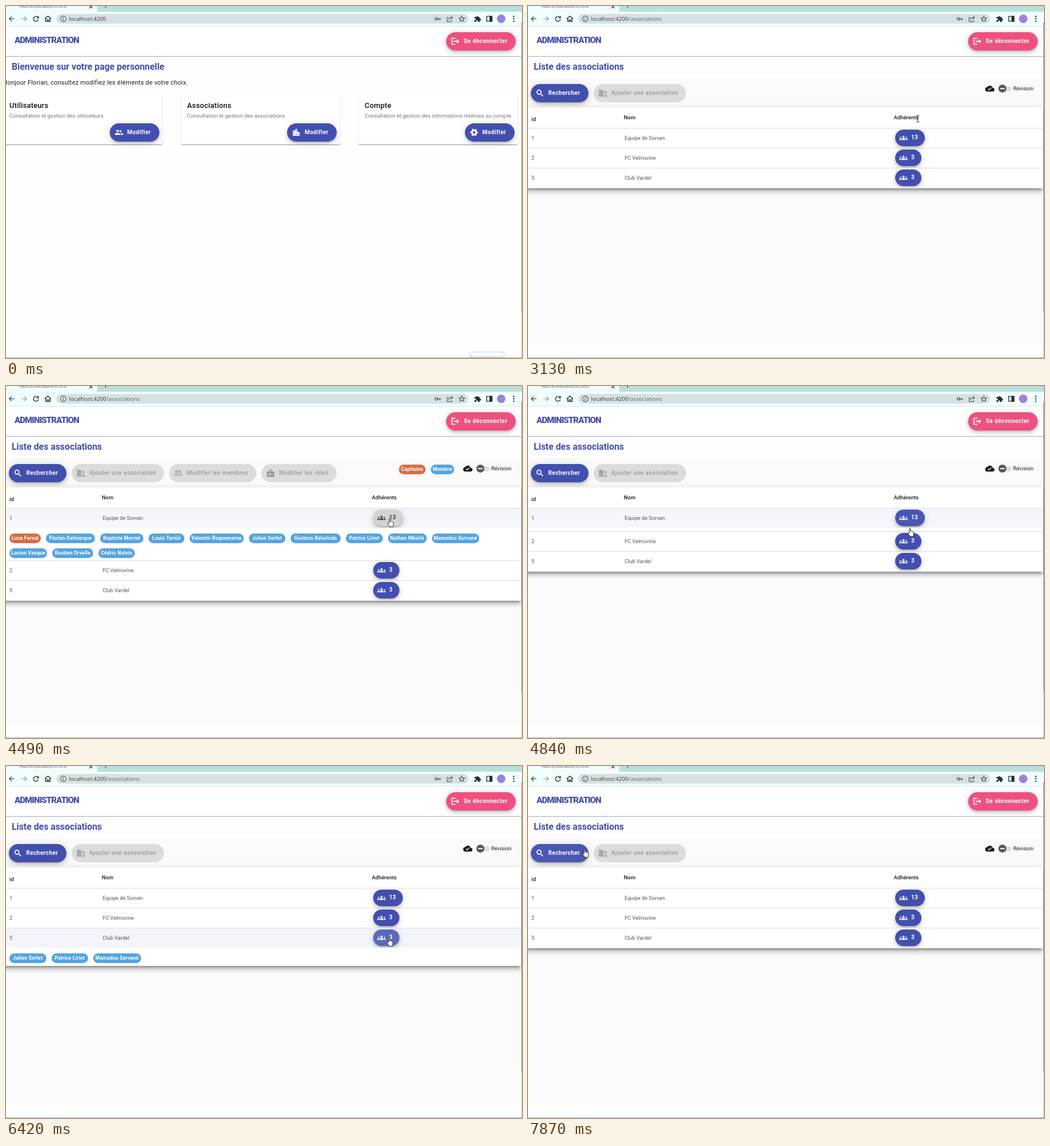
Animation of 905x618 px, one loop 7.99 s. Source, as an HTML page:

```html
<!DOCTYPE html>
<html lang="fr">
<head>
<meta charset="utf-8">
<title>Administration</title>
<style>
html, body { margin: 0; width: 100%; height: 100%; overflow: hidden; background: #fff; }
#stage { position: relative; width: 905px; height: 618px; overflow: hidden; background: #fefefe; font-family: Roboto, sans-serif; color: #1c1c1c; }
#stage div, #stage span, #stage svg { position: absolute; box-sizing: border-box; }
.t { white-space: nowrap; line-height: 20px; margin-top: -10px; }
.i { width: 16px; height: 16px; fill: currentColor; }
.line { fill: none; stroke: currentColor; stroke-width: 2; }
.page { inset: 0; }

/* Browser frame */
.tabs { width: 905px; height: 11px; background: #b9dfdc; }
.tab { width: 160px; height: 11px; background: #f0fdfc; border-radius: 0 0 4px 0; }
.bar { top: 10px; width: 905px; height: 26px; background: #f1fefe; border-bottom: 1px solid #dfe5e5; }
.url { left: 88px; top: 14px; width: 723px; height: 17px; border-radius: 9px; background: #d8e1e2; }
.addr { left: 110.5px; top: 22.5px; font: 9.7px/20px "Open Sans", sans-serif; color: #33393a; }
.addr span { position: static !important; color: #596163; }
.bar ~ .i { color: #2a2e30; width: 13px; height: 13px; top: 16px; }

/* Application */
.head { top: 36px; width: 904px; height: 53px; background: #fff; border-bottom: 1px solid #aaa; }
.brand { left: 15px; top: 59.5px; font-size: 15px; font-weight: 900; letter-spacing: -.9px; color: #434fae; }
.title { left: 10px; top: 106.5px; font-size: 16px; font-weight: 700; letter-spacing: -.09px; color: #434fae; }
.pill { height: 31.5px; padding-left: 31px; border-radius: 16px; background: #434fae; color: #fff; white-space: nowrap;
  font-size: 10px; font-weight: 700; line-height: 31.5px; letter-spacing: .45px;
  box-shadow: 0 2px 3px -1px rgba(0,0,0,.2), 0 4px 7px rgba(0,0,0,.14), 0 1px 13px rgba(0,0,0,.12); }
.pill .i { left: 8px; top: 8px; }
.pill.off { background: #dcdcdc; color: #989898; box-shadow: none; font-weight: 500; letter-spacing: .5px; }
.card { top: 155px; width: 279px; height: 88px; background: #fff; border-radius: 3px;
  box-shadow: 0 1px 1px rgba(0,0,0,.35), 0 1px 2px rgba(0,0,0,.14); }
.card b { position: absolute; left: 11px; top: 10px; font-size: 13px; line-height: 20px; font-weight: 500; letter-spacing: .18px; color: #111; }
.card i { position: absolute; left: 11px; top: 28px; font-size: 9.5px; line-height: 20px; font-style: normal; color: #777; white-space: nowrap; }
.card .pill { left: 186.5px; top: 51px; width: 87px; }
.chip { height: 17px; border-radius: 9px; background: #56a4df; color: #fff; font-size: 8.6px; font-weight: 700; line-height: 17px;
  letter-spacing: .25px; text-align: center; white-space: nowrap; }
.chip.cap { background: #d46f43; }

/* Table */
.back { top: 128px; width: 904px; height: 466px; background: #fafafa; }
.table { top: 178px; left: -6px; width: 909px; background: #fff;
  box-shadow: 0 4px 4px -2px rgba(0,0,0,.34), 0 6px 7px 1px rgba(0,0,0,.15), 0 2px 10px 1px rgba(0,0,0,.12); }
#stage .cols, #stage .body, #stage .row, #stage .more { position: relative; }
.cols { height: 37px; border-bottom: 1px solid #ddd; font-size: 9.5px; font-weight: 500; }
.body { overflow: hidden; }
.row { height: 34px; font-size: 9.2px; color: #555; }
.more { height: 1px; overflow: hidden; border-bottom: 1px solid #ddd; background: #fff; }
.row:nth-last-child(2) + .more { border-color: transparent; }
.count { left: 650px; top: 2px; height: 28.5px; padding-left: 28px; line-height: 28.5px; letter-spacing: .3px; }
.count .i { left: 7px; top: 7px; width: 15px; height: 15px; }

/* Timeline */
.anim { animation: 7.99s step-end infinite; }
.toast { animation-name: toast; }
.home { animation-name: leave; }
.list { animation-name: arrive; }
.nom { animation-name: nom; }
.adh { animation-name: adh; }
.body { animation-name: load; }
.legend { animation-name: legend; }
.go { animation-name: go; }
.find { animation-name: find; }
.row.r0 { animation-name: tint0; }
.row.r2 { animation-name: tint2; }
.r0 .count { animation-name: count0; }
.r2 .count { animation-name: count2; }
.more.r0 { animation: open0 7.99s cubic-bezier(.4,0,.2,1) infinite; }
.more.r2 { animation: open2 7.99s cubic-bezier(.4,0,.2,1) infinite; }
.cursor { animation: path 7.99s ease-in-out infinite; }
.arrow { animation-name: arrow; }
.hand { animation-name: hand; }
.beam { animation-name: beam; }

@keyframes toast { 0% { opacity: 1 } 1.38% { opacity: 0 } }
@keyframes leave { 0% { opacity: 1 } 16.77% { opacity: 0 } }
@keyframes arrive { 0% { opacity: 0 } 16.77% { opacity: 1 } }
@keyframes nom { 0% { left: 292px } 21.03% { left: 174px } }
@keyframes adh { 0% { left: 538px } 21.03% { left: 647.5px } }
@keyframes load { 0% { max-height: 0 } 21.03% { max-height: 400px } }
@keyframes legend { 0% { opacity: 0 } 47.4% { opacity: 1 } 57.57% { opacity: 0 } 67.58% { opacity: 1 } 78.97% { opacity: 0 } }
@keyframes go { 0% { background: #434fae } 12.52% { background: #4d59b3 } }
@keyframes find { 0% { background: #434fae } 95.74% { background: #4a56b2 } }
@keyframes tint0 { 0% { background: #fff } 47.4% { background: #f5f6fb } 61.9% { background: #fff } }
@keyframes tint2 { 0% { background: #fff } 67.58% { background: #f4f5fa } 85% { background: #fff } }
@keyframes count0 {
  0% { background: #434fae; color: #fff } 42% { background: #4a56b2; color: #fff }
  47.4% { background: #d3d3d4; color: #3c3c44 } 57.57% { background: #5d68b9; color: #fff }
  59.5% { background: #4a56b2; color: #fff } 62.5% { background: #434fae; color: #fff } }
@keyframes count2 {
  0% { background: #434fae; color: #fff } 65% { background: #4a56b2; color: #fff }
  67.58% { background: #d3d3d4; color: #3c3c44 } 78.97% { background: #5d68b9; color: #fff }
  82.6% { background: #434fae; color: #fff } }
@keyframes open0 { 0%, 48.2% { height: 1px } 51.58%, 58.5% { height: 58px } 61.88%, 100% { height: 1px } }
@keyframes open2 { 0%, 68.59% { height: 1px } 71.96%, 81.6% { height: 32px } 84.98%, 100% { height: 1px } }
@keyframes path {
  0%, 1.88% { transform: translate(745px, 620px) }
  11.26% { transform: translate(531px, 225px) }
  14%, 16.7% { transform: translate(527px, 220px) }
  19%, 23.78% { transform: translate(523px, 217px) }
  28.79% { transform: translate(630px, 262px) }
  34%, 40.6% { transform: translate(683.5px, 198px) }
  44.93%, 56.2% { transform: translate(673px, 232px) }
  60.58%, 61.5% { transform: translate(670px, 249px) }
  66%, 82.1% { transform: translate(672px, 301px) }
  89% { transform: translate(350px, 166px) }
  96.5%, 100% { transform: translate(99.5px, 145px) } }
@keyframes arrow {
  0% { opacity: 0 } 1.88% { opacity: 1 } 12.52% { opacity: 0 } 16.77% { opacity: 1 }
  33% { opacity: 0 } 83% { opacity: 1 } 95.74% { opacity: 0 } }
@keyframes hand {
  0% { opacity: 0 } 12.52% { opacity: 1 } 16.77% { opacity: 0 } 42% { opacity: 1 }
  83% { opacity: 0 } 95.74% { opacity: 1 } }
@keyframes beam { 0% { opacity: 0 } 33% { opacity: 1 } 42% { opacity: 0 } }
</style>
</head>
<body>
<svg width="0" height="0" style="position:absolute">
  <symbol id="search" viewBox="0 0 24 24"><path d="M15.5 14h-.8l-.3-.3A6.5 6.5 0 1 0 13.7 14.4l.3.3v.8l5 5 1.5-1.5zM9.5 14a4.5 4.5 0 1 1 0-9 4.5 4.5 0 0 1 0 9z" stroke="currentColor" stroke-width=".6"/></symbol>
  <symbol id="people" viewBox="0 0 24 24"><circle cx="8.5" cy="8" r="3.2"/><circle cx="16" cy="8.5" r="2.6"/><path d="M1.5 18.5v-2c0-2.3 4.7-3.5 7-3.5s7 1.2 7 3.5v2zM17 18.5h6v-2c0-2-3.5-3.3-6.5-3.3 1 1 .9 2 .5 3.3z"/></symbol>
  <symbol id="city" viewBox="0 0 24 24"><path fill-rule="evenodd" d="M15 11V5l-3-3-3 3v2H3v14h18V11zM5 9h2v2H5zm0 4h2v2H5zm0 4h2v2H5zM11 5h2v2h-2zm0 4h2v2h-2zm0 4h2v2h-2zm0 4h2v2h-2zm6-4h2v2h-2zm0 4h2v2h-2z"/></symbol>
  <symbol id="gear" viewBox="0 0 24 24"><g fill="none" stroke="currentColor"><circle cx="12" cy="12" r="5.6" stroke-width="4.4"/><circle cx="12" cy="12" r="8.6" stroke-width="3" pathLength="12" stroke-dasharray="1" stroke-dashoffset=".5"/></g></symbol>
  <symbol id="exit" viewBox="0 0 24 24"><path d="M17 7l-1.4 1.4 2.6 2.6H8v2h10.2l-2.6 2.6L17 17l5-5zM4 5h8V3H4a2 2 0 0 0-2 2v14a2 2 0 0 0 2 2h8v-2H4z" stroke="currentColor" stroke-width=".6"/></symbol>
  <symbol id="groups" viewBox="0 0 24 24"><circle cx="12" cy="9" r="3"/><circle cx="4" cy="11" r="2"/><circle cx="20" cy="11" r="2"/><path d="M6 18v-1.6c0-2.4 3-3.6 6-3.6s6 1.2 6 3.6V18zM0 18v-1.6C0 14.6 2.6 13.7 5.1 14.1c-.4.7-.6 1.5-.6 2.3V18zM24 18v-1.6c0-1.8-2.6-2.7-5.1-2.3.4.7.6 1.5.6 2.3V18z"/></symbol>
  <symbol id="cloud" viewBox="0 0 24 24"><path d="M19.35 10A7.5 7.5 0 0 0 5.35 8 6 6 0 0 0 6 20h13a5 5 0 0 0 .35-10zM10 17l-3.5-3.5 1.4-1.4 2.1 2.1L15.2 9l1.4 1.4z"/></symbol>
  <symbol id="building" viewBox="0 0 24 24"><path fill-rule="evenodd" d="M12 7V3H2v18h14v-2h-4v-2h2v-2h-2v-2h2v-2h-2V9h8v5h2V7zM4 5h2v2H4zm0 4h2v2H4zm0 4h2v2H4zm0 4h2v2H4zM8 5h2v2H8zm0 4h2v2H8zm0 4h2v2H8zm0 4h2v2H8zM15 11h3v2h-3zM19 15h2v3h3v2h-3v3h-2v-3h-3v-2h3z"/></symbol>
  <symbol id="pair" viewBox="0 0 24 24"><g fill="none" stroke="currentColor" stroke-width="1.8"><circle cx="8" cy="8" r="2.8"/><circle cx="16" cy="8" r="2.8"/><path d="M2 18v-1.5c0-4 12-4 12 0V18zM16 13.5c3 0 6 1 6 3V18h-5"/></g></symbol>
  <symbol id="badge" viewBox="0 0 24 24"><path fill-rule="evenodd" d="M9 2h6v5h5a2 2 0 0 1 2 2v11a2 2 0 0 1-2 2H4a2 2 0 0 1-2-2V9a2 2 0 0 1 2-2h5zM11 4v5h2V4zM7 12h4v3H7zm-1 4h6v2H6zm8-4h4v1.5h-4zm0 3h4v1.5h-4z"/></symbol>
</svg>

<div id="stage">
  <div class="tabs"></div>
  <div class="tab"></div>
  <span class="t" style="left:24px;top:-.5px;font:9px/20px 'Open Sans',sans-serif;color:#556">Administrationfront</span>
  <svg class="line" style="left:145px;top:-4px;color:#333;stroke-width:1.2" width="34" height="9"><path d="M1 8l6-6M1 2l6 6M29.5 0v7"/></svg>
  <div class="bar"></div>
  <div class="url"></div>
  <svg class="i line" style="left:4px" viewBox="0 0 24 24"><path d="M20 12H4M11 4.5L3.5 12l7.5 7.5"/></svg>
  <svg class="i line" style="left:25px;color:#8d9799" viewBox="0 0 24 24"><path d="M4 12h16M13 4.5l7.5 7.5-7.5 7.5"/></svg>
  <svg class="i line" style="left:46px;stroke-width:2.6" viewBox="0 0 24 24"><path d="M18.5 7A8 8 0 1 0 20 14M20 3v6.5h-6.5"/></svg>
  <svg class="i line" style="left:67px;stroke-width:2.6" viewBox="0 0 24 24"><path d="M2 12l10-9 10 9M5 10.5V21h5v-6h4v6h5V10.5"/></svg>
  <svg class="i line" style="left:93.5px;color:#4b5355" viewBox="0 0 24 24"><circle cx="12" cy="12" r="9"/><path d="M12 11v6M12 7v2"/></svg>
  <span class="t addr">localhost:4200<span class="anim list">/associations</span></span>
  <svg class="i line" style="left:751px;color:#555d5f;stroke-width:2.6" viewBox="0 0 24 24"><circle cx="7" cy="12" r="4"/><path d="M11 12h11M18 12v5"/></svg>
  <svg class="i line" style="left:772px;color:#555d5f" viewBox="0 0 24 24"><path d="M8 8H3v13h15v-5M7 16c1-6 5-8 13-8M15 3l6 5-6 5"/></svg>
  <svg class="i line" style="left:793px;color:#444c4e" viewBox="0 0 24 24"><path d="M12 3l2.7 6 6.3.6-4.8 4.3 1.5 6.3-5.7-3.4-5.7 3.4 1.5-6.3L3 9.6l6.3-.6z"/></svg>
  <svg class="i" style="left:819.5px" viewBox="0 0 24 24"><path d="M3 6h6a3 3 0 1 1 6 0h5v6a3 3 0 1 1 0 5v5h-6a3 3 0 1 0-5 0H3v-6a3 3 0 1 0 0-5z"/></svg>
  <svg class="i line" style="left:841px;stroke-width:2.6" viewBox="0 0 24 24"><path d="M4 4h17v16H4z"/><path d="M14 4h7v16h-7z" fill="currentColor"/></svg>
  <div style="left:861px;top:15px;width:15px;height:15px;border-radius:50%;background:#9a82dc"></div>
  <svg class="i" style="left:883.5px" viewBox="0 0 24 24"><circle cx="12" cy="4" r="2.3"/><circle cx="12" cy="12" r="2.3"/><circle cx="12" cy="20" r="2.3"/></svg>

  <div class="page anim home">
    <span class="t title">Bienvenue sur votre page personnelle</span>
    <span class="t" style="right:586px;top:135px;font-size:11px;letter-spacing:.2px">Bonjour Florian, consultez modifiez les éléments de votre choix.</span>
    <div class="card" style="left:-5px"><b>Utilisateurs</b><i>Consultation et gestion des utilisateurs</i>
      <div class="pill"><svg class="i"><use href="#people"/></svg>Modifier</div></div>
    <div class="card" style="left:306.5px"><b>Associations</b><i>Consultation et gestion des associations</i>
      <div class="pill anim go"><svg class="i"><use href="#city"/></svg>Modifier</div></div>
    <div class="card" style="left:618px"><b>Compte</b><i>Consultation et gestion des informations relatives au compte</i>
      <div class="pill"><svg class="i"><use href="#gear"/></svg>Modifier</div></div>
  </div>

  <div class="page anim list">
    <span class="t title">Liste des associations</span>
    <div class="back"></div>
    <div class="pill anim find" style="left:4.5px;top:137px;width:101px"><svg class="i"><use href="#search"/></svg>Rechercher</div>
    <div class="pill off" style="left:115px;top:137px;width:162px"><svg class="i"><use href="#building"/></svg>Ajouter une association</div>
    <div class="page anim legend">
      <div class="pill off" style="left:286px;top:137px;width:153px"><svg class="i"><use href="#pair"/></svg>Modifier les membres</div>
      <div class="pill off" style="left:448px;top:137px;width:132px"><svg class="i"><use href="#badge"/></svg>Modifier les rôles</div>
      <div class="chip cap" style="left:689px;top:137.5px;width:47px">Capitaine</div>
      <div class="chip" style="left:745px;top:137.5px;width:41px">Membre</div>
    </div>
    <svg class="i" style="left:802px;top:137px"><use href="#cloud"/></svg>
    <div style="left:832px;top:140.5px;width:16px;height:9px;border-radius:5px;background:#dedede"></div>
    <div style="left:824.5px;top:138px;width:14px;height:14px;border-radius:50%;background:#5a5a5a"></div>
    <div style="left:827.5px;top:144.3px;width:8px;height:1.5px;background:#eee"></div>
    <span class="t" style="left:851px;top:144.5px;font-size:9.5px">Révision</span>
    <div class="table">
      <div class="cols">
        <span class="t" style="left:12px;top:20.5px">id</span>
        <span class="t anim nom" style="top:18px">Nom</span>
        <span class="t anim adh" style="top:18px">Adhérents</span>
      </div>
      <div class="body anim" id="body"></div>
    </div>
  </div>

  <div class="head"></div>
  <span class="t brand">ADMINISTRATION</span>
  <div class="pill" style="left:772px;top:46px;width:122px;background:#ef5080"><svg class="i"><use href="#exit"/></svg>Se déconnecter</div>

  <div class="anim toast" style="left:813px;top:607px;width:61px;height:20px;border:1px solid #d0d0d0;background:#fff;color:#aaa;font-size:8.5px;line-height:19px;text-align:center">Enregistrement</div>
  <div style="left:904px;top:28px;width:1px;height:508px;background:#858585"></div>
  <div style="left:904px;top:536px;width:1px;height:82px;background:#c8c8c8"></div>
  <div style="top:617px;width:905px;height:1px;background:#b0b0b0"></div>

  <div class="cursor">
    <svg class="anim arrow" width="10" height="14"><path d="M.5.5v10.5l2.5-2.2 1.6 3.5 1.6-.7-1.5-3.4h3.3z" fill="#fff" stroke="#111" stroke-width=".9"/></svg>
    <svg class="anim hand" style="left:-5px;top:0" width="14" height="17"><path d="M4 9V1.8c0-1.6 2-1.6 2 0V6c.5-.8 1.8-.6 1.9.4.5-.7 1.7-.5 1.8.5.5-.6 1.7-.3 1.7.8v3.6c0 2-1 2.7-1 4H5.2c-.5-1.8-2.7-3.5-3.7-5.3-.5-1.2.8-2 1.6-1.1z" fill="#fff" stroke="#111" stroke-width=".9"/></svg>
    <svg class="anim beam line" style="left:-4px;top:-6px;stroke-width:1;color:#222" width="8" height="12"><path d="M1.5.5h2l.5.5.5-.5h2M4 1v10M1.5 11.5h2l.5-.5.5.5h2"/></svg>
  </div>
</div>

<script>
const members = [
  ['Luca Ferval', 55], ['Florian Delmarque', 86], ['Baptiste Morvel', 76], ['Louis Tarnié', 63],
  ['Valentin Roquemarne', 94.5], ['Julien Sorlet', 64.5], ['Gustavo Belarinda', 88],
  ['Patrice Liriet', 64.5], ['Nathan Mbolié', 68], ['Mamadou Sarvané', 83.5],
  ['Lucien Vasque', 66], ['Bastien Orvelle', 72], ['Cédric Nolvin', 64]
];
const clubs = [
  { id: 1, name: 'Equipe de Sorvan', team: members, size: 13, width: 51.5 },
  { id: 2, name: 'FC Velmorine', team: [], size: 3, width: 46 },
  { id: 5, name: 'Club Vardel', team: [5, 7, 9].map(n => members[n]), size: 3, width: 46 }
];

// Chips flow from the left and wrap after ten.
function chips(team) {
  let x = 12;
  return team.map(([name, width], n) => {
    if (n === 10) x = 12;
    const top = n < 10 ? 10 : 36;
    const html = `<div class="chip${name === members[0][0] ? ' cap' : ''}" style="left:${x}px;top:${top}px;width:${width}px">${name}</div>`;
    x += width + 9;
    return html;
  }).join('');
}

document.getElementById('body').innerHTML = clubs.map((club, n) => `
  <div class="row anim r${n}">
    <span class="t" style="left:12px;top:17px">${club.id}</span>
    <span class="t" style="left:175.5px;top:17px">${club.name}</span>
    <div class="pill count anim" style="width:${club.width}px"><svg class="i"><use href="#groups"/></svg>${club.size}</div>
  </div>
  <div class="more r${n}">${chips(club.team)}</div>`).join('');
</script>
</body>
</html>
```
